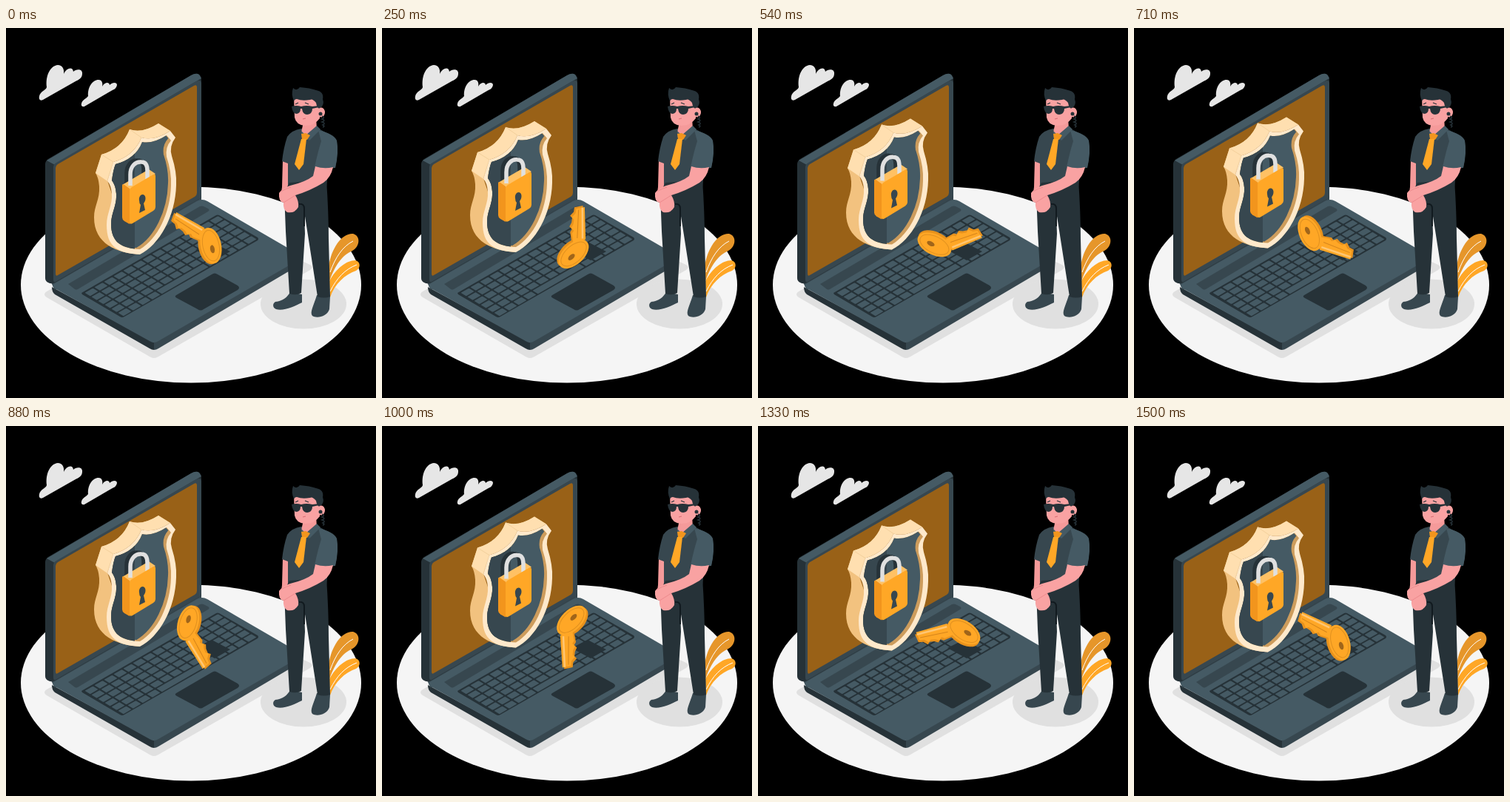
These frames come from a looping animation (500 by 500 pixels, 1.54 s). An HTML page:

```html
<!DOCTYPE html>
<html lang="en">
<head>
<meta charset="utf-8">
<title>Laptop security</title>
<style>
  html, body { margin: 0; width: 100%; height: 100%; overflow: hidden; background: #000; }
  svg { display: block; width: 100vw; height: 100vh; }
</style>
</head>
<body>
<svg viewBox="0 0 500 500">
  <defs>
    <path id="hole" d="M143 206Q145 191 148 184Q175 177 184 154Q198 157 217 145L223 152Q215 161 217 174Q224 195 223 213C222 250 205 285 181 299C157 298 142 290 142 265C142 250 150 240 149 224Q148 212 143 206Z"/>
    <clipPath id="holeClip"><use href="#hole"/></clipPath>
    <path id="shackle" d="M168 213V198C168 187 175 180 183 181C189 181 191 186 191 193V204" fill="none" stroke-width="5.5"/>
    <g id="keyShape">
      <path d="M230 249L268 270L264 287L252 282L250 278L245 279L242 274L237 270L233 271L231 264L226 260Z"/>
      <ellipse cx="277" cy="294" rx="14" ry="24.5" transform="rotate(-12 277 294)"/>
    </g>
  </defs>

  <ellipse cx="250" cy="347" rx="230" ry="132.5" fill="#f5f5f5"/>
  <g fill="#e0e0e0">
    <path d="M55 356L250 245L411 320Q416 323 411 327L206 444Q200 448 194 444L55 364Q49 360 55 356Z"/>
    <ellipse cx="402" cy="373" rx="58" ry="33.5"/>
  </g>
  <g fill="#e6e6e6">
    <path d="M45 92C46 86 54 84 55 80C53 64 60 51 70 50C76 50 79 55 78 62C81 55 90 51 91 59C95 55 104 55 103 62C103 68 98 70 94 72L50 97C46 99 44 96 45 92Z"/>
    <path d="M102 102C103 97 109 95 111 92C110 80 117 70 125 70C130 70 131 75 130 79C133 74 139 72 140 77C144 73 150 73 150 77C149 82 146 83 142 85L106 106C103 107 101 105 102 102Z"/>
  </g>

  <!-- laptop -->
  <path d="M62 350L200 425V435Q197 435 194 433L66 360Q62 357 62 350Z" fill="#263238"/>
  <path d="M200 424L400 308V316Q400 318 397 320L206 433Q203 435 200 435Z" fill="#37474f"/>
  <path d="M60 342L264 226V240L66 354Z" fill="#37474f"/>
  <path d="M66 345L258 234Q265 230 272 234L396 306Q402 310 396 313L206 423Q200 427 194 423L66 352Q60 348 66 345Z" fill="#455a64"/>
  <path d="M84 346L262 241Q265 240 267 241L273 244Q276 246 273 248L97 353Q95 354 93 353Z" fill="#37474f"/>
  <path d="M53 184Q53 180 57 177L250 64Q257 60 261 63Q264 65 264 71V226Q264 229 261 231L68 343Q62 347 57 344Q53 342 53 338Z" fill="#263238"/>
  <path d="M55 179L250 64Q257 60 261 63L264 68L66 185Z" fill="#455a64"/>
  <path d="M64 188Q64 184 68 182L255 73Q264 68 264 75V226Q264 229 261 231L67 343Q64 344 64 340Z" fill="#37474f"/>
  <path d="M67 189Q67 186 70 184L254 78Q258 76 258 80V223Q258 226 255 228L70 334Q67 336 67 332Z" fill="#996117"/>
  <path d="M102 358L284 253Q286 252 288 253L340 283Q342 285 340 287L160 390Q157 392 154 390L103 360Z" fill="#263238"/>
  <g id="keyboard" fill="#455a64" transform="matrix(13 -7.5 9 5.4 104.5 358)"></g>
  <path d="M256 300L278 289L303 302L282 314Z" fill="#263238"/>
  <path d="M230 361L278 333Q282 330 286 333L313 348Q317 351 313 354L267 380Q263 383 259 380L231 365Q227 363 230 361Z" fill="#263238"/>

  <!-- shield and padlock -->
  <g id="shield">
    <path d="M121 196L129 171Q157 163 167 137Q184 143 206 129L222 139L183 148L145 181L137 206L143 224L181 306C150 304 119 292 119 256C119 240 127 232 126 214Q125 202 121 196Z" fill="#f2c27f"/>
    <path d="M121 196L129 171Q157 163 167 137Q184 143 206 129L222 139Q200 153 183 148Q173 173 145 181L137 207Z" fill="#ffdfb0"/>
    <path d="M129 171L145 181L137 206M167 137L183 148" fill="none" stroke="#edc993" stroke-width=".7"/>
    <path d="M137 207L145 181Q173 173 183 148Q200 153 222 139L229 148Q220 160 224 173Q231 195 230 212C229 255 207 293 181 306C151 304 136 296 136 266C136 250 144 240 143 224Q142 212 137 207Z" fill="#ffe9cb"/>
    <use href="#hole" fill="#cd9c5c"/>
    <g clip-path="url(#holeClip)">
      <use href="#hole" x="-5" y="-3" fill="#455a64" stroke="#455a64" stroke-width="2"/>
      <path d="M130 140H174V310H130Z" fill="#37474f"/>
    </g>
    <use href="#shackle" x="-5" y="-2" stroke="#263238"/>
    <path d="M157 212L193 191L202 197L167 219Z" fill="#ffc164"/>
    <use href="#shackle" stroke="#e0e0e0"/>
    <path d="M157 213Q157 210 160 212L167 217V265L160 261Q157 259 157 256Z" fill="#f2951d"/>
    <path d="M167 219Q167 217 170 215L199 198Q202 197 202 200V242Q202 245 199 247L171 264Q167 266 167 263Z" fill="#ffa726"/>
    <path d="M180 233C179 227 184 223 187 226C190 229 188 235 186 237L188 246L180 250L182 239Q180 237 180 233Z" fill="#37474f"/>
  </g>

  <!-- key -->
  <g id="key">
    <use href="#keyShape" x="-3" y="1" fill="#e8921c"/>
    <use href="#keyShape" fill="#ffa726"/>
    <path d="M229 252L265 273" stroke="#ffc672" stroke-width="2.5"/>
    <path d="M229 258L261 279" stroke="#d5851c"/>
    <g transform="rotate(-12 277 294)">
      <ellipse cx="277" cy="294" rx="11" ry="21" fill="none" stroke="#e0901f"/>
      <ellipse cx="278" cy="299" rx="3" ry="5.5" fill="#a0651a"/>
    </g>
  </g>

  <!-- plant -->
  <path d="M436 322C440 297 454 277 469 278C480 281 478 296 468 301C455 307 446 318 437 342Z" fill="#e6962a"/>
  <path d="M437 342C446 325 460 314 472 314C480 316 479 325 473 328C458 333 444 346 438 364Z" fill="#ffa726"/>
  <path d="M438 330C445 310 455 295 469 288M438 356C447 338 458 326 474 320" fill="none" stroke="#fff"/>

  <!-- guard -->
  <g fill="#37474f">
    <path d="M384 357L400 360V371C390 376 375 383 365 380C360 378 360 372 364 370C374 369 380 364 384 357Z"/>
    <path d="M420 361L438 363L437 380C434 390 420 393 414 389C410 384 416 375 420 361Z"/>
  </g>
  <path d="M374 178L384 178L383 214L376 226Q371 224 373 215Z" fill="#f59a9a"/>
  <path d="M399 136Q386 138 380 147Q375 162 373 180L381 183L381 216H433L435 191L445 188Q449 170 447 153Q443 146 422 136Z" fill="#37474f"/>
  <path d="M376 222L383 209L433 205Q436 250 436 285L438 363Q430 366 421 363L403 248L404 278L399 358Q392 362 383 359L378 275Z" fill="#263238"/>
  <path d="M396 238Q403 237 403 244V268" fill="none" stroke="#111a1f" stroke-width="2"/>
  <path d="M422 138Q443 143 447 152Q450 168 445 189Q431 191 417 188Q422 165 426 153Z" fill="#455a64"/>
  <path d="M418 187Q430 191 442 188Q439 202 429 209Q411 220 391 226Q396 234 395 242Q390 251 380 249Q374 245 375 236Q368 235 369 223Q374 216 384 213Q405 208 415 200Z" fill="#f9a2a2"/>
  <path d="M375 236Q383 231 391 226M371 221Q379 217 385 215" fill="none" stroke="#e98588" stroke-width=".8"/>
  <path d="M403 122H419L420 136L407 147L399 141Z" fill="#f59a9a"/>
  <path d="M389 94Q390 85 405 86L424 95L424 122Q417 132 404 132Q392 131 390 121Z" fill="#f9a2a2"/>
  <path d="M389 99Q385 89 388 81Q393 86 397 80Q411 81 419 84Q430 86 428 96Q431 104 424 109Q420 108 419 101Q414 95 411 97Q400 99 393 96Q390 96 389 99Z" fill="#263238"/>
  <ellipse cx="426" cy="114" rx="5" ry="6.5" fill="#f9a2a2"/>
  <path d="M386 106Q392 104 399 106Q406 104 414 106L423 105V107L414 109Q414 116 407 117Q401 117 400 109H398Q398 116 392 116Q387 115 386 106Z" fill="#263238"/>
  <path d="M391 103L395 101M404 101L409 103" stroke="#263238" stroke-width="1.2"/>
  <path d="M401 123L405 122" stroke="#d96d74"/>
  <circle cx="425" cy="116" r="2.5" fill="#263238"/>
  <path d="M427 119q5 2 0 4q6 2 0 4q6 2 1 4q4 2 0 3" fill="none" stroke="#263238" stroke-width="1.4"/>
  <path d="M399 139L405 145L420 132L425 137L410 152L404 146L399 148Z" fill="#455a64"/>
  <path d="M399 143L405 142L411 145L407 151L400 150Z" fill="#f2951d"/>
  <path d="M399 150L406 150L402 184L396 192L390 184Z" fill="#ffa726"/>
</svg>
<script>
  const LOOP = 1540, TURN = 1520, COLUMNS = 14, ROWS = 6;
  const byId = id => document.getElementById(id);

  const keyRect = (x, y, w) =>
    `<rect x="${x + .08}" y="${y + .1}" width="${w - .16}" height=".8" rx=".08"/>`;
  let keys = '';
  for (let row = 0; row < ROWS; row++) {
    for (let col = 0; col < COLUMNS; col++) {
      const space = row === ROWS - 1 && col === 4;
      keys += keyRect(col, row, space ? 5 : 1);
      if (space) col += 4;
    }
  }
  byId('keyboard').innerHTML = keys;

  function draw() {
    const time = performance.now() % LOOP;
    const lift = 9.3 * (1 - Math.abs(2 * time / LOOP - 1));
    byId('shield').setAttribute('transform', `translate(0 ${-lift})`);
    byId('key').setAttribute('transform', `rotate(${360 * time / TURN} 258 284)`);
    requestAnimationFrame(draw);
  }
  draw();
</script>
</body>
</html>
```
